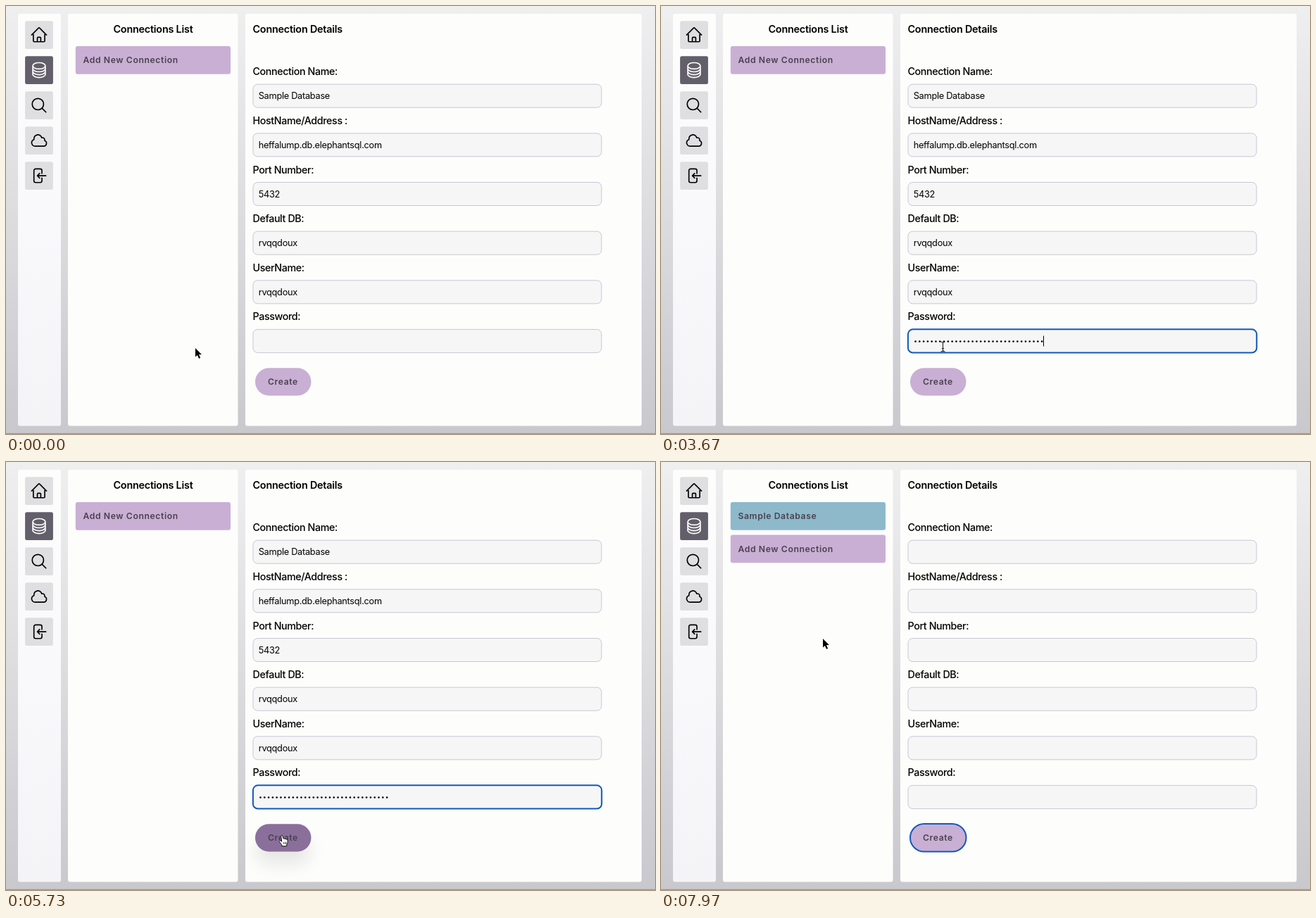
These frames come from a looping animation (922 px wide and 608 px high, 7990 ms). An HTML page:

```html
<!DOCTYPE html>
<html lang="en">
<head>
<meta charset="utf-8">
<title>Connections</title>
<style>
  html, body { margin: 0; width: 100%; height: 100%; overflow: hidden; }
  svg { display: block; font-family: Inter, "Liberation Sans", sans-serif; }
  .head { font-size: 14.4px; font-weight: 600; letter-spacing: -.23px; }
  .label { font-size: 14.3px; font-weight: 500; letter-spacing: -.4px; }
  .value { font-size: 12.8px; letter-spacing: -.3px; }
  .btn { font-size: 12.2px; font-weight: 600; letter-spacing: .6px; fill: #4a4150; }
  .panel { fill: #fdfdfc; }
  .field { fill: #f6f6f6; stroke: #c9c7d6; }
  .ring { fill: none; stroke: #1259bb; stroke-width: 2; }
  .icon { fill: none; stroke: #000; stroke-width: 1.55; stroke-linecap: round; stroke-linejoin: round; }
</style>
</head>
<body>
<svg id="stage" width="922" height="608" viewBox="0 0 922 608">
  <defs>
    <linearGradient id="page" x2="0" y2="1">
      <stop stop-color="#efeff0"/><stop offset=".5" stop-color="#dcdbde"/><stop offset="1" stop-color="#c9c8cd"/>
    </linearGradient>
    <linearGradient id="side" x2="0" y2="1">
      <stop stop-color="#fdfdfc"/><stop offset=".5" stop-color="#f9f9fb"/><stop offset="1" stop-color="#f4f4f6"/>
    </linearGradient>
    <filter id="soft" x="-60%" y="-120%" width="220%" height="340%"><feGaussianBlur stdDeviation="12"/></filter>
  </defs>
  <rect width="922" height="608" fill="url(#page)"/>
  <rect y="606.8" width="922" height="1.2" fill="#98979b"/>
  <rect x="17" y="11" width="61" height="585.5" rx="3" fill="url(#side)"/>
  <rect class="panel" x="88" y="11" width="241.5" height="585.5" rx="3"/>
  <rect class="panel" x="340" y="11" width="563" height="585.5" rx="3"/>
  <g id="nav"></g>

  <text class="head" x="209" y="37.6" text-anchor="middle">Connections List</text>
  <g id="saved">
    <rect x="98.8" y="57" width="220.2" height="39.7" rx="3" fill="#8db9cb"/>
    <text class="btn" x="109.5" y="81.2">Sample Database</text>
  </g>
  <g id="add">
    <rect x="98.8" y="57" width="220.2" height="39.7" rx="3" fill="#c9afd4"/>
    <text class="btn" x="109.5" y="81.2">Add New Connection</text>
  </g>

  <text class="head" x="350.5" y="37.6">Connection Details</text>
  <g id="form"></g>
  <g id="values"></g>
  <path id="dots" d="M361.5 476.5H541.2" fill="none" stroke="#000" stroke-width="2.7" stroke-linecap="round" stroke-dasharray="0 5.795"/>
  <rect id="inputRing" class="ring" x="350.9" y="459.3" width="495.4" height="33.2" rx="7"/>
  <rect id="caret" y="468.5" width="1" height="15"/>

  <rect id="shadow" x="354" y="533" width="79.5" height="39" rx="19.5" filter="url(#soft)"/>
  <rect id="create" x="354" y="514.2" width="79.5" height="39.2" rx="19.6"/>
  <text class="btn" x="372" y="538.3">Create</text>
  <rect id="createRing" class="ring" x="354" y="514" width="79.5" height="39.6" rx="19.8"/>

  <g id="arrow">
    <path d="M0 0V12.6L2.9 9.9 5 14.8 7.1 13.9 5.1 9.1H9Z" fill="#000" stroke="#fff" stroke-width="1.1" paint-order="stroke"/>
  </g>
  <g id="beam" fill="none" stroke="#222" stroke-width="1.1">
    <path d="M-3-7Q0-7 0-5Q0-7 3-7M0-5V5M-3 7Q0 7 0 5Q0 7 3 7M-1.6 2.5H1.6"/>
  </g>
  <g id="hand" fill="#fff" stroke="#111" stroke-linejoin="round">
    <path d="M-1.3 1Q-.2-.5 1 1L2.2 5Q3.6 4.1 4.2 5.4Q5.6 4.5 6.2 6Q7.8 5.4 8.1 7.2V10.5L6.8 13V15.5H-.2V13.6L-3.4 9.6Q-5 7.4-3.4 7.1Q-2.2 7.1-.3 9Z"/>
    <path d="M2.2 9.5V12.8M4.3 9.5V12.8M6 9.5V12.8" stroke-width=".7"/>
  </g>
</svg>
<script>
const LOOP = 7990;
const FOCUS = 1690, CARET_OFF = 2650, PASTE = 3200, CLICK = 6400, SAVED = 7300;
const HOVER_IN = 4720, HOVER_OUT = 7665, FADE = 260;
const el = id => document.getElementById(id);
const clamp = v => Math.max(0, Math.min(1, v));

const icons = [
  'm2.25 12 8.954-8.955c.44-.439 1.152-.439 1.591 0L21.75 12M4.5 9.75v10.125c0 .621.504 1.125 1.125 1.125H9.75v-4.875c0-.621.504-1.125 1.125-1.125h2.25c.621 0 1.125.504 1.125 1.125V21h4.125c.621 0 1.125-.504 1.125-1.125V9.75M8.25 21h8.25',
  'M20.25 6.375a8.25 4.125 0 0 1-16.5 0a8.25 4.125 0 0 1 16.5 0v11.25a8.25 4.125 0 0 1-16.5 0V6.375M20.25 10.125a8.25 4.125 0 0 1-16.5 0M20.25 13.875a8.25 4.125 0 0 1-16.5 0',
  'm21 21-5.197-5.197A7.5 7.5 0 1 0 5.196 5.196a7.5 7.5 0 0 0 10.607 10.607',
  'M2.25 15a4.5 4.5 0 0 0 4.5 4.5H18a3.75 3.75 0 0 0 1.332-7.257 3 3 0 0 0-3.758-3.848 5.25 5.25 0 0 0-10.233 2.33A4.502 4.502 0 0 0 2.25 15Z',
  'M15.75 9V5.25A2.25 2.25 0 0 0 13.5 3h-6a2.25 2.25 0 0 0-2.25 2.25v13.5A2.25 2.25 0 0 0 7.5 21h6a2.25 2.25 0 0 0 2.25-2.25V15m-3 0-3-3 3-3m-3 3H21'
];
el('nav').innerHTML = icons.map((d, i) => `
  <g transform="translate(27.1 ${21.3 + 50 * i})">
    <rect width="39.8" height="39.6" rx="2.5" fill="${i === 1 ? '#625f6a' : '#dfdee1'}"/>
    <path class="icon" d="${d}" transform="translate(6.9 6.8) scale(1.08)" ${i === 1 ? 'style="stroke:#fff"' : ''}/>
  </g>`).join('');

const fields = [
  ['Connection Name:', 'Sample Database'],
  ['HostName/Address :', 'heffalump.db.elephantsql.com'],
  ['Port Number:', '5432'],
  ['Default DB:', 'rvqqdoux'],
  ['UserName:', 'rvqqdoux'],
  ['Password:', '']
];
const PITCH = 69.65;
el('form').innerHTML = fields.map(([label], i) => `
  <text class="label" x="350.5" y="${98.2 + PITCH * i}">${label}</text>
  <rect class="field" x="351" y="${111.2 + PITCH * i}" width="495" height="33" rx="6.5"/>`).join('');
el('values').innerHTML = fields.map(([, value], i) =>
  `<text class="value" x="358.7" y="${132.4 + PITCH * i}">${value}</text>`).join('');

// Pointer stops: time, x, y
const path = [
  [20, 269, 486], [410, 400.5, 485], [730, 400.5, 485], [850, 400.5, 484],
  [4450, 400.5, 484], [4610, 398, 505], [4800, 392, 530.2],
  [7640, 392, 530.2], [7930, 230, 251]
];
function pointer(t) {
  let i = path.findIndex(p => p[0] > t);
  if (i < 0) i = path.length;
  const a = path[Math.max(0, i - 1)], b = path[Math.min(i, path.length - 1)];
  const k = clamp((t - a[0]) / (b[0] - a[0] || 1));
  return [1, 2].map(j => a[j] + (b[j] - a[j]) * k);
}

const show = (id, on) => el(id).style.display = on ? '' : 'none';

function caretOn(t) {
  if (t < FOCUS || t >= CLICK) return false;
  if (t < PASTE) return t < CARET_OFF || t >= CARET_OFF + 500;
  return (t - PASTE) % 1000 < 500;
}

function draw(t) {
  const saved = t >= SAVED;
  show('saved', saved);
  el('add').setAttribute('transform', `translate(0 ${saved ? 46.6 : 0})`);
  show('values', !saved);
  show('dots', t >= PASTE && !saved);
  show('inputRing', t >= FOCUS && t < CLICK);
  show('createRing', t >= CLICK);
  show('caret', caretOn(t));
  el('caret').setAttribute('x', t < PASTE ? 359 : 543);

  const hover = clamp((t - HOVER_IN) / FADE) - clamp((t - HOVER_OUT) / FADE);
  const mix = [[201, 138], [175, 111], [212, 155]].map(([a, b]) => Math.round(a + (b - a) * hover));
  el('create').setAttribute('fill', `rgb(${mix})`);
  el('shadow').setAttribute('opacity', .085 * hover);

  const [x, y] = pointer(t);
  const inside = (l, top, r, bottom) => x > l && x < r && y > top && y < bottom;
  const kind = inside(351, 459, 846, 493) ? 'beam' : inside(354, 514, 434, 554) ? 'hand' : 'arrow';
  for (const id of ['arrow', 'beam', 'hand']) show(id, id === kind);
  el(kind).setAttribute('transform', `translate(${x} ${y})`);
}

const start = performance.now();
function tick() {
  draw((performance.now() - start) % LOOP);
  requestAnimationFrame(tick);
}
tick();
</script>
</body>
</html>
```
